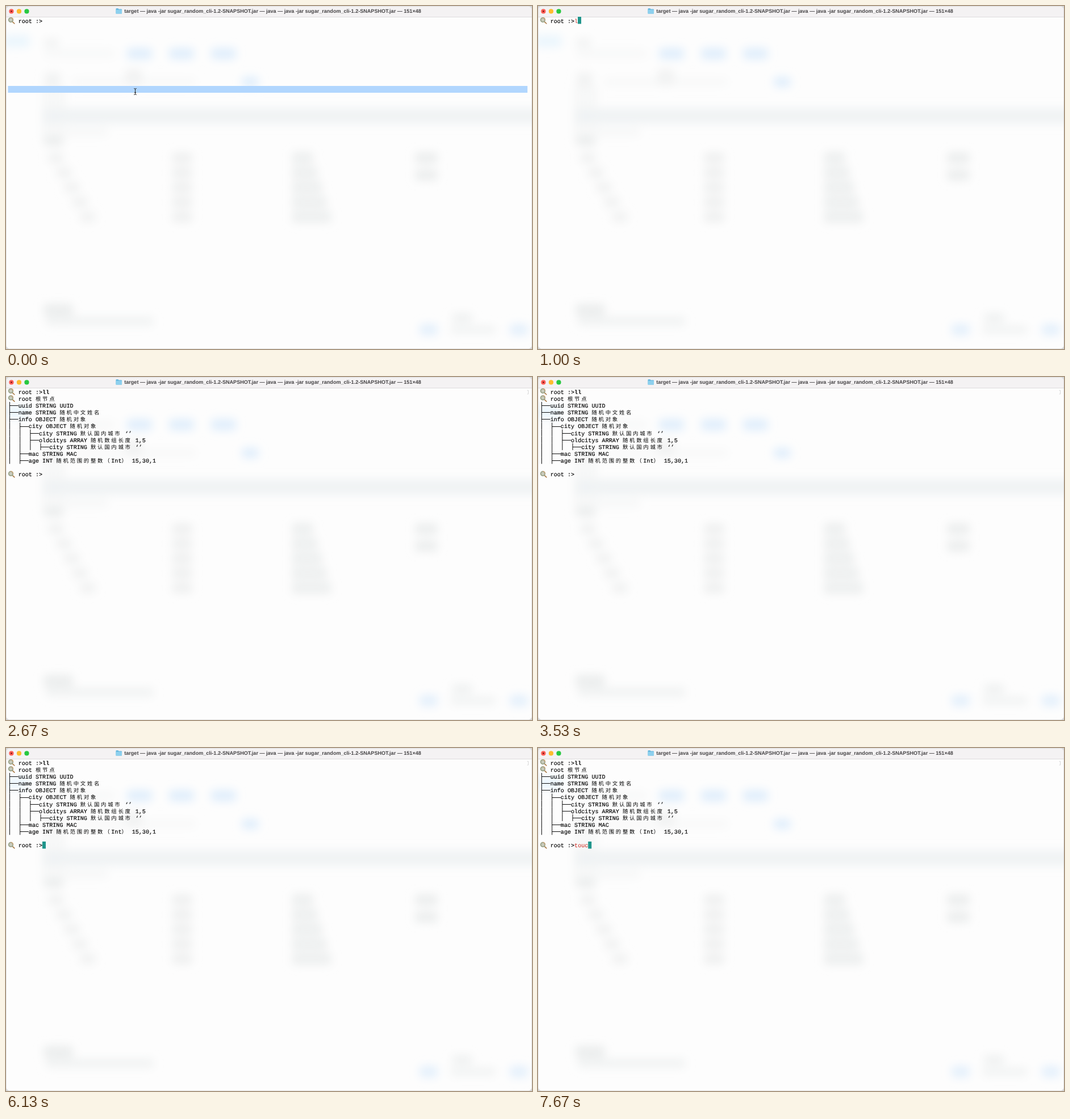
An HTML page that plays this animation: 926 px wide and 605 px high, repeating every 8000 ms.

```html
<!DOCTYPE html>
<html lang="en">
<head>
<meta charset="utf-8">
<title>Terminal</title>
<style>
  html, body { margin: 0; width: 100%; height: 100%; overflow: hidden; background: #d2d2d2; }
  svg { display: block; }
  text { white-space: pre; text-rendering: geometricPrecision; }
  .mono { font: 10.1px "Liberation Mono", monospace; fill: #000; stroke: #000; stroke-width: .16px; }
  .wide { font: 9.4px "Noto Sans CJK SC", "Noto Sans CJK", sans-serif; stroke: none; }
  .bold { font-weight: 700; stroke-width: 0; }
  .red { fill: #cf3a31; stroke: #cf3a31; stroke-width: .1px; }
  .title { font: 700 9.07px "Liberation Sans", sans-serif; fill: #464446; }
  .tree { stroke: #111; fill: none; }
</style>
</head>
<body>
<svg width="926" height="605" viewBox="0 0 926 605">
  <defs>
    <filter id="blur" filterUnits="userSpaceOnUse" x="-40" y="-40" width="1010" height="690">
      <feGaussianBlur stdDeviation="8"/>
    </filter>
    <clipPath id="window"><rect width="926" height="605" rx="6"/></clipPath>
    <g id="candy">
      <path d="M8 8.2L11.4 11.4" stroke="#a97a45" stroke-width="1.6" stroke-linecap="round"/>
      <circle cx="5" cy="5" r="4.6" fill="#98a287"/>
      <path d="M5 1A4 4 0 0 1 9 5" stroke="#d3a06f" stroke-width="1.2" fill="none"/>
      <circle cx="5" cy="5" r="2.8" fill="#c9cabb"/>
    </g>
  </defs>
  <g clip-path="url(#window)">
    <rect width="926" height="605" fill="#fdfdfd"/>
    <g id="backdrop" filter="url(#blur)"></g>
    <rect width="926" height="19" fill="#f4f2f3"/>
    <rect y="19" width="926" height="1" fill="#dedcdd"/>
    <g id="lights"></g>
    <path d="M193.5 5.2q0-.9.9-.9h3l1.2 1.3h4.6q.8 0 .8.9v6.2q0 .9-.9.9h-8.7q-.9 0-.9-.9z" fill="#5cb3dc"/>
    <rect x="193.5" y="6.6" width="10.5" height="7" rx=".9" fill="#8dd0ee"/>
    <text class="title" x="469.5" y="12.2" text-anchor="middle">target — java -jar sugar_random_cli-1.2-SNAPSHOT.jar — java — java -jar sugar_random_cli-1.2-SNAPSHOT.jar — 151×48</text>
    <g id="select">
      <rect x="3.5" y="141" width="914.5" height="12" fill="#b1d6fe"/>
      <path d="M225.3 145.5q2.2 0 2.2 1.5v8q0 1.5-2.2 1.5M229.7 145.5q-2.2 0-2.2 1.5v8q0 1.5 2.2 1.5M226 152.5h3" fill="none" stroke="#222"/>
    </g>
    <g id="first"></g>
    <g id="output">
      <path d="M917.5 23.5h2v6.5h-2" fill="none" stroke="#cfcfcf" stroke-width=".8"/>
    </g>
    <rect id="cursor" width="6" height="12.5" fill="#1f958b"/>
    <g id="input"></g>
  </g>
  <rect x=".25" y=".25" width="925.5" height="604.5" rx="6" fill="none" stroke="#c4c4c4" stroke-width=".6"/>
</svg>
<script>
const $ = id => document.getElementById(id);
const LEFT = 3.5, TOP = 19.6, CELL = 6.06, ROW = 12.15;
const colX = col => LEFT + col * CELL;
const rowY = row => TOP + row * ROW;

function add(parent, tag, attrs) {
  const el = document.createElementNS('http://www.w3.org/2000/svg', tag);
  for (const key in attrs) el.setAttribute(key, attrs[key]);
  return parent.appendChild(el);
}

// Terminal grid text: wide characters take two cells.
function print(parent, row, col, str, style = '') {
  for (const run of str.match(/[\u2e80-\uffef]+|[^\u2e80-\uffef]+/g)) {
    const wide = run[0] >= '\u2e80', step = wide ? 2 : 1, start = col;
    const x = [...run].map((_, i) => colX(start + i * step).toFixed(2)).join(' ');
    add(parent, 'text', { class: `mono ${wide ? 'wide' : style}`, x, y: rowY(row) + 10 }).textContent = run;
    col += run.length * step;
  }
}

function prompt(parent, row, str) {
  add(parent, 'use', { href: '#candy', x: LEFT, y: rowY(row) });
  print(parent, row, 3, str);
}

function branch(row, depth, str) {
  const y = rowY(row), mid = Math.floor(y + ROW / 2 + .6) + .5;
  let d = `M${colX(depth * 3 + .5)} ${mid}H${colX(depth * 3 + 3)}`;
  for (let i = 0; i <= depth; i++) d += `M${colX(i * 3 + .5)} ${y}v${ROW}`;
  add($('output'), 'path', { class: 'tree', d });
  print($('output'), row, depth * 3 + 3, str);
}

// Blurred web page behind the window.
function smudge(x, y, w, h, fill = '#eceeee') {
  add($('backdrop'), 'rect', { x: x - w / 2, y: y - h / 2, width: w, height: h, rx: 6, fill });
}
function page() {
  const blue = '#e0eefc', faint = '#f7f8f8';
  smudge(18, 62, 48, 22, '#ebf6fd');
  smudge(130, 84, 125, 14, faint);
  smudge(225, 134, 220, 12, faint);
  smudge(84, 190, 42, 100, faint);
  smudge(125, 222, 110, 16, faint);
  smudge(510, 194, 890, 27, '#f0f3f4');
  for (let i = 0; i < 3; i++) smudge(235 + 74 * i, 84, 44, 20, blue);
  smudge(430, 134, 30, 18, blue);
  smudge(80, 65, 26, 16, '#f2f3f3');
  smudge(82, 130, 28, 26, '#f2f3f3');
  smudge(225, 126, 30, 30, '#f2f3f3');
  smudge(84, 238, 34, 18);
  // Table: an indented tree, then three columns.
  for (let i = 0; i < 5; i++) {
    const y = 268 + 26 * i;
    smudge(88 + 14 * i, y, 28, 18, '#f1f2f2');
    smudge(310, y, 36, 19, '#eff0f0');
    smudge(522 + 4 * i, y, 38 + 8 * i, 22, '#eef0f0');
    if (i < 2) smudge(740, y + 4 * i, 40, 20);
  }
  smudge(92, 536, 52, 22);
  smudge(165, 556, 190, 16, '#f1f3f3');
  smudge(803, 550, 36, 16, '#eff1f1');
  smudge(822, 571, 80, 14, '#f1f3f3');
  for (const x of [744, 903]) smudge(x, 571, 32, 20, '#e4f0fc');
}
page();

['#fe5f57', '#febc2e', '#28c840'].forEach((fill, i) =>
  add($('lights'), 'circle', { cx: 9.5 + i * 13.5, cy: 9.4, r: 4.1, fill }));
add($('lights'), 'circle', { cx: 9.5, cy: 9.4, r: 1.3, fill: '#7d0f0a' });

prompt($('first'), 0, 'root :>');
print($('output'), 0, 10, 'll', 'bold');
prompt($('output'), 1, 'root 根节点');
// Leading dots give the depth.
`uuid STRING UUID
name STRING 随机中文姓名
info OBJECT 随机对象
.city OBJECT 随机对象
..city STRING 默认国内城市 ‘’
..oldcitys ARRAY 随机数组长度 1,5
...city STRING 默认国内城市 ‘’
.mac STRING MAC
.age INT 随机范围的整数（Int） 15,30,1`.split('\n').forEach((line, i) => {
  const str = line.replace(/^\.+/, '');
  branch(i + 2, line.length - str.length, str);
});
prompt($('output'), 12, 'root :>');

const LOOP = 8000, CLEAR = 1000, RUN = 1400, REST = 2670, TOUCH = 7130;

function typedAt(t) {
  if (t >= TOUCH) return 'touc'.slice(0, 1 + (t - TOUCH) / 180);
  return t >= CLEAR && t < RUN ? 'll'.slice(0, 1 + (t - CLEAR) / 270) : '';
}

// Solid while typing; otherwise a one-second blink whose lit part shortens.
function cursorAt(t) {
  if (t >= TOUCH || t >= CLEAR && t < REST) return true;
  const beat = Math.floor((t - 130) / 1000), phase = t - 130 - beat * 1000;
  return beat >= 0 && t < CLEAR + 0 || t > REST
    ? phase < Math.max(270, 540 - 60 * beat)
    : false;
}

const show = (id, on) => $(id).setAttribute('visibility', on ? 'visible' : 'hidden');
let shown;

function draw() {
  const t = performance.now() % LOOP;
  const typed = typedAt(t), row = t >= RUN ? 12 : 0;
  show('select', t < CLEAR);
  show('output', t >= RUN);
  show('cursor', cursorAt(t));
  $('cursor').setAttribute('x', colX(10 + typed.length) - .1);
  $('cursor').setAttribute('y', Math.floor(rowY(row)));
  if (typed !== shown) {
    shown = typed;
    $('input').replaceChildren();
    if (typed) print($('input'), row, 10, typed, typed === 'll' ? 'bold' : 'red');
  }
  requestAnimationFrame(draw);
}
draw();
</script>
</body>
</html>
```
